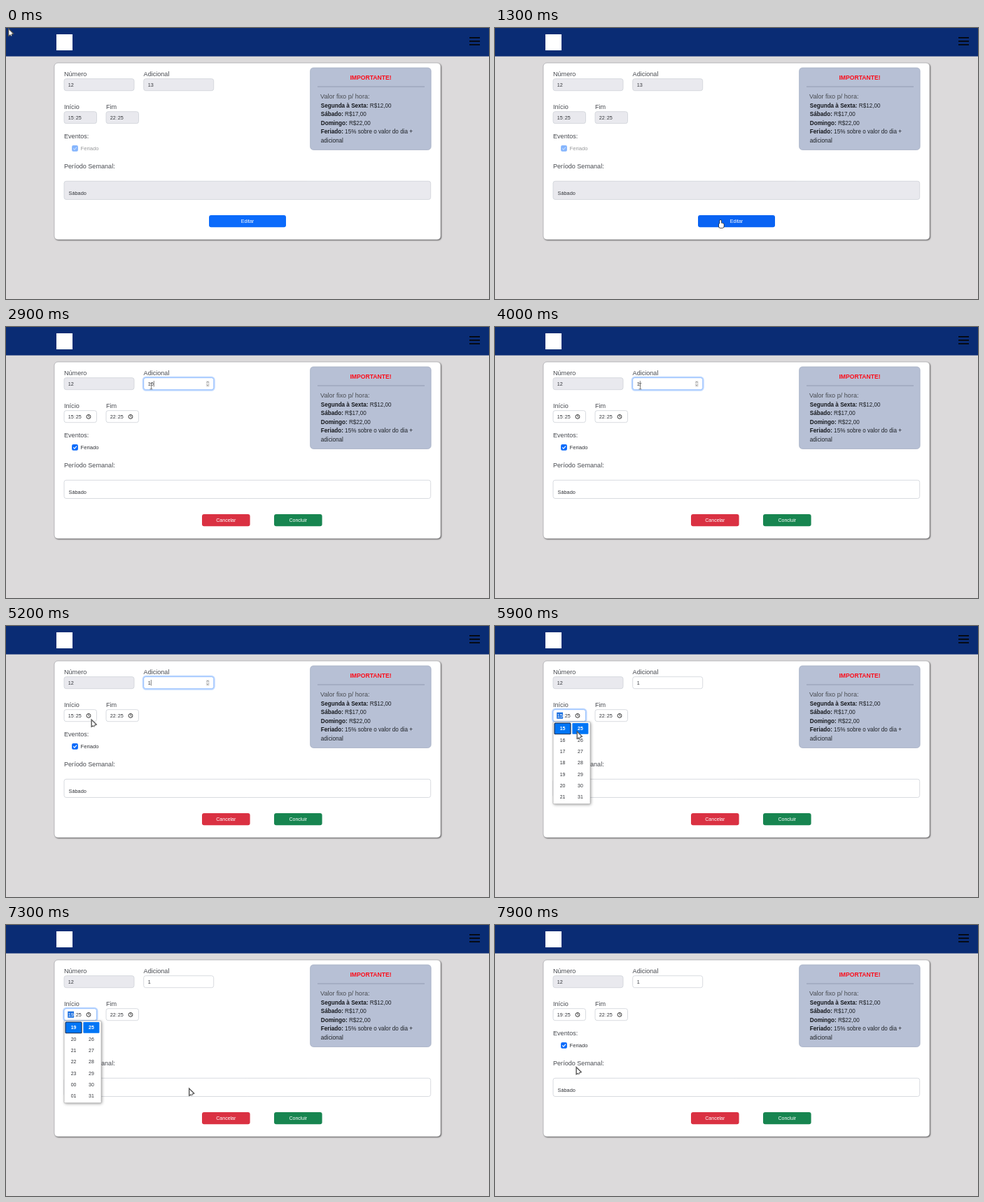
An HTML page with a canvas that plays this animation: 690 px wide and 388 px high, repeating every 8 s.

```html
<!DOCTYPE html>
<html lang="pt-BR">
<head>
<meta charset="utf-8">
<title>Adicional</title>
<style>
html, body { margin: 0; width: 100%; height: 100%; overflow: hidden; background: #dcdadb; }
canvas { display: block; }
</style>
</head>
<body>
<canvas id="stage" width="690" height="388"></canvas>
<script>
const ctx = document.getElementById('stage').getContext('2d');
const LOOP = 8000, TICK = 100;
const FONT = '"Liberation Sans", Arial, sans-serif';
const BLUE = '#0b6bfb', INK = '#33353a', LABEL = '#484b51';
const LEFT = 83, FIELD_H = 17, BUTTON_Y = 268, BUTTON_H = 17.3;

// Moments at which the form changes state
const EDIT = 1600, FOCUS = 2400, ERASE = 2700, TYPE_ZERO = 2800, ERASE_ZERO = 4000,
      OPEN = 5600, PICK = 6900, CLOSE = 7400;

// Each pointer move leaves the previous place at `from` and rests after `to`
const HOME = { x: 4, y: 2 };
const MOVES = [
  { from: 0, to: 1000, x: 322, y: 275 },
  { from: 1800, to: 1900, x: 155, y: 122.5 },
  { from: 1900, to: 2400, x: 207, y: 84.5 },
  { from: 4400, to: 5200, x: 122.5, y: 135 },
  { from: OPEN, to: 6600, x: 100, y: 214 },
  { from: PICK, to: 7300, x: 262, y: 235 },
  { from: 7300, to: 7900, x: 116.5, y: 204.5 }
];

function ease(k) {
  k = Math.min(1, Math.max(0, k));
  return k * k * (3 - 2 * k);
}

function pointerAt(t) {
  return MOVES.reduce((p, m) => {
    const k = ease((t - m.from) / (m.to - m.from));
    return { x: p.x + (m.x - p.x) * k, y: p.y + (m.y - p.y) * k };
  }, HOME);
}

const inside = (p, x, y, w, h) => p.x >= x && p.x <= x + w && p.y >= y && p.y <= y + h;

// Draws text centred vertically on cy and returns its width
function text(str, x, cy, size, { color = INK, bold = false, align = 'left' } = {}) {
  ctx.font = `${bold ? 'bold ' : ''}${size}px ${FONT}`;
  ctx.fillStyle = color;
  ctx.textAlign = align;
  ctx.fillText(str, x, cy + size * 0.36);
  return ctx.measureText(str).width;
}

const label = (str, x, cy) => text(str, x, cy, 9.08, { color: LABEL });

function rect(x, y, w, h, color) {
  ctx.fillStyle = color;
  ctx.fillRect(x, y, w, h);
}

function box(x, y, w, h, r, fill, stroke, line = 0.8) {
  ctx.beginPath();
  ctx.roundRect(x, y, w, h, r);
  if (fill) { ctx.fillStyle = fill; ctx.fill(); }
  if (stroke) { ctx.strokeStyle = stroke; ctx.lineWidth = line; ctx.stroke(); }
}

function raisedBox(x, y, w, h, r, border, shadow, blur) {
  ctx.save();
  ctx.shadowColor = shadow;
  ctx.shadowBlur = blur;
  ctx.shadowOffsetX = ctx.shadowOffsetY = 1;
  box(x, y, w, h, r, '#fff');
  ctx.restore();
  box(x, y, w, h, r, null, border, 0.7);
}

function polyline(points, color, width) {
  ctx.beginPath();
  points.forEach(([x, y]) => ctx.lineTo(x, y));
  ctx.strokeStyle = color;
  ctx.lineWidth = width;
  ctx.stroke();
}

function field(x, y, w, h, enabled, focused) {
  if (focused) box(x - 0.8, y - 0.8, w + 1.6, h + 1.6, 4, null, 'rgba(13,110,253,.26)', 2.4);
  box(x, y, w, h, 3, enabled ? '#fff' : '#e9e9ee', focused ? '#86b7fe' : '#cfd2d9');
}

function button(caption, x, w, fill) {
  box(x, BUTTON_Y, w, BUTTON_H, 3, fill);
  text(caption, x + w / 2, 276.2, 7, { color: '#fff', align: 'center' });
}

function timeField(x, hour, enabled, focused) {
  const cy = 128.2;
  field(x, cy - FIELD_H / 2, 46.5, FIELD_H, enabled, focused);
  if (focused) rect(x + 5.2, cy - 4.5, 8.8, 9, '#1a6fe0');
  text(hour, x + 5.7, cy, 7.2, { color: focused ? '#fff' : INK });
  text(':', x + 14.2, cy, 7.2, { color: '#777' });
  text('25', x + 16.7, cy, 7.2);
  if (!enabled) return;
  const cx = x + 35;
  ctx.beginPath();
  ctx.arc(cx, cy + 0.2, 2.9, 0, Math.PI * 2);
  ctx.strokeStyle = '#222';
  ctx.lineWidth = 0.9;
  ctx.stroke();
  polyline([[cx, cy - 2], [cx, cy], [cx + 1.4, cy + 1]], '#222', 0.8);
}

function pageFrame() {
  rect(0, 0, 690, 388, '#dcdadb');
  rect(0, 0, 690, 40.6, '#0a2c74');
  rect(72, 9, 23, 23, '#fff');
  for (let i = 0; i < 3; i++) rect(662, 13 + i * 5, 15, 1.8, '#05070d');
  raisedBox(69, 50, 552, 253, 5, '#a9a9ac', 'rgba(0,0,0,.65)', 2);
}

function notice() {
  box(434.7, 57, 172.4, 117.4, 4.5, '#b7c0d5', '#a3acc2');
  text('IMPORTANTE!', 521, 71.2, 8.64, { color: '#fb0d1b', bold: true, align: 'center' });
  rect(445, 83.5, 153, 1, '#929cb2');
  label('Valor fixo p/ hora:', 449, 98);
  const lines = [
    'Segunda à Sexta:| R$12,00', 'Sábado:| R$17,00', 'Domingo:| R$22,00',
    'Feriado:| 15% sobre o valor do dia +', '|adicional'
  ];
  lines.forEach((line, i) => {
    const [day, rest] = line.split('|'), y = 111.2 + i * 12.36;
    const w = text(day, 449.8, y, 8.15, { bold: true, color: '#15171c' });
    text(rest, 449.8 + w, y, 8.15, { color: '#1f2228' });
  });
}

function extraField(t) {
  const focused = t >= FOCUS && t < OPEN;
  const value = t < ERASE ? '13' : t >= TYPE_ZERO && t < ERASE_ZERO ? '10' : '1';
  const x = 196.7, cy = 81.2;
  field(x, cy - FIELD_H / 2, 100, FIELD_H, t >= EDIT, focused);
  const w = text(value, x + 6, cy, 7.2);
  if (!focused) return;
  rect(x + 6.2 + w, cy - 4.2, 0.6, 8.5, '#333');
  box(x + 89.1, cy - 4.2, 4.8, 8.8, 1, '#e3e3e3');
  for (const side of [-1, 1]) {
    const tip = cy + side * 3;
    polyline([-1.4, 0, 1.4].map(dx => [x + 91.5 + dx, tip - side * Math.abs(dx)]), '#777', 0.8);
  }
}

function form(t, p) {
  const on = t >= EDIT;
  label('Número', LEFT, 65.7);
  label('Adicional', 196.6, 65.7);
  label('Início', LEFT, 112.8);
  label('Fim', 143, 112.8);
  label('Eventos:', LEFT, 155.2);
  label('Período Semanal:', LEFT, 197.5);

  field(LEFT, 72.7, 100, FIELD_H, false);
  text('12', LEFT + 5.8, 81.2, 7.2);
  extraField(t);
  timeField(LEFT, t >= PICK ? '19' : '15', on, t >= OPEN && t < CLOSE);
  timeField(143, '22', on);

  ctx.globalAlpha = on ? 1 : 0.5;
  box(94.1, 167.9, 8.8, 8.8, 2, BLUE);
  polyline([[96.2, 172.4], [97.9, 174.1], [101, 170.7]], '#fff', 1.2);
  text('Feriado', 106.5, 172.4, 7.67);
  ctx.globalAlpha = 1;

  field(LEFT, 219.3, 523.7, 26.2, on);
  text('Sábado', 89.5, 236.7, 7.35);

  if (on) {
    button('Cancelar', 280, 68.6, overButton(t, p) ? '#bf2d3c' : '#da3142');
    button('Concluir', 383, 68.6, '#178550');
  } else {
    button('Editar', 290, 110, overButton(t, p) ? '#0963f3' : BLUE);
  }
}

function overButton(t, p) {
  const [x, w] = t < EDIT ? [290, 110] : [280, 68.6];
  return inside(p, x, BUTTON_Y, w, BUTTON_H);
}

function pickerColumn(x, first, modulo, outline, p) {
  const pitch = 16.33, w = 23, h = 15.8;
  for (let i = 0; i < 7; i++) {
    const cy = 146.9 + i * pitch, chosen = i === 0;
    const hover = inside(p, x, cy - pitch / 2, w, pitch);
    if (chosen) box(x, cy - h / 2, w, h, 1, '#0075f5', outline, 1.1);
    else if (hover) box(x, cy - h / 2, w, h, 1, '#a9cdf9');
    const value = String((first + i) % modulo).padStart(2, '0');
    text(value, x + w / 2, cy, 6.9, { color: chosen ? '#fff' : INK, bold: chosen, align: 'center' });
  }
}

function timePicker(t, p) {
  if (t < OPEN || t >= CLOSE) return;
  raisedBox(LEFT, 137.2, 53, 117.6, 1, '#aaa', 'rgba(0,0,0,.4)', 4);
  pickerColumn(85, t >= PICK ? 19 : 15, 24, '#10294f', p);
  pickerColumn(110.4, 25, 60, null, p);
}

function arrow() {
  const size = 8.6, slant = size * 0.7;
  const tail = [[size * 0.25, size * 0.6], [size * 0.44, size * 1.08]];
  polyline(tail, '#555', 2.1);
  ctx.beginPath();
  ctx.moveTo(0, 0);
  ctx.lineTo(0, size);
  ctx.lineTo(slant, slant);
  ctx.closePath();
  ctx.stroke();
  ctx.strokeStyle = '#555';
  ctx.lineWidth = 0.7;
  ctx.fillStyle = '#fff';
  ctx.fill();
  ctx.stroke();
  polyline(tail, '#fff', 0.9);
}

function hand() {
  for (const outline of ['#222', null]) {
    box(-2, 4.6, 6.8, 6.4, 2, '#fff', outline, 1.4);
    box(-0.8, 0, 2, 7, 1, '#fff', outline, 1.4);
  }
}

function textBeam() {
  rect(0, -4, 0.8, 8.5, '#666');
  for (const y of [-4.3, 4]) rect(-1.6, y, 4, 0.8, '#666');
}

function pointer(t, p) {
  const overInput = t >= EDIT && inside(p, 197, 73, 100, FIELD_H);
  ctx.save();
  ctx.translate(p.x, p.y);
  (overButton(t, p) ? hand : overInput ? textBeam : arrow)();
  ctx.restore();
}

function draw(now) {
  const t = Math.floor((now % LOOP) / TICK) * TICK;
  const p = pointerAt(t);
  pageFrame();
  notice();
  form(t, p);
  timePicker(t, p);
  pointer(t, p);
}

const start = performance.now();
function loop() {
  draw(performance.now() - start);
  requestAnimationFrame(loop);
}
loop();
</script>
</body>
</html>
```
